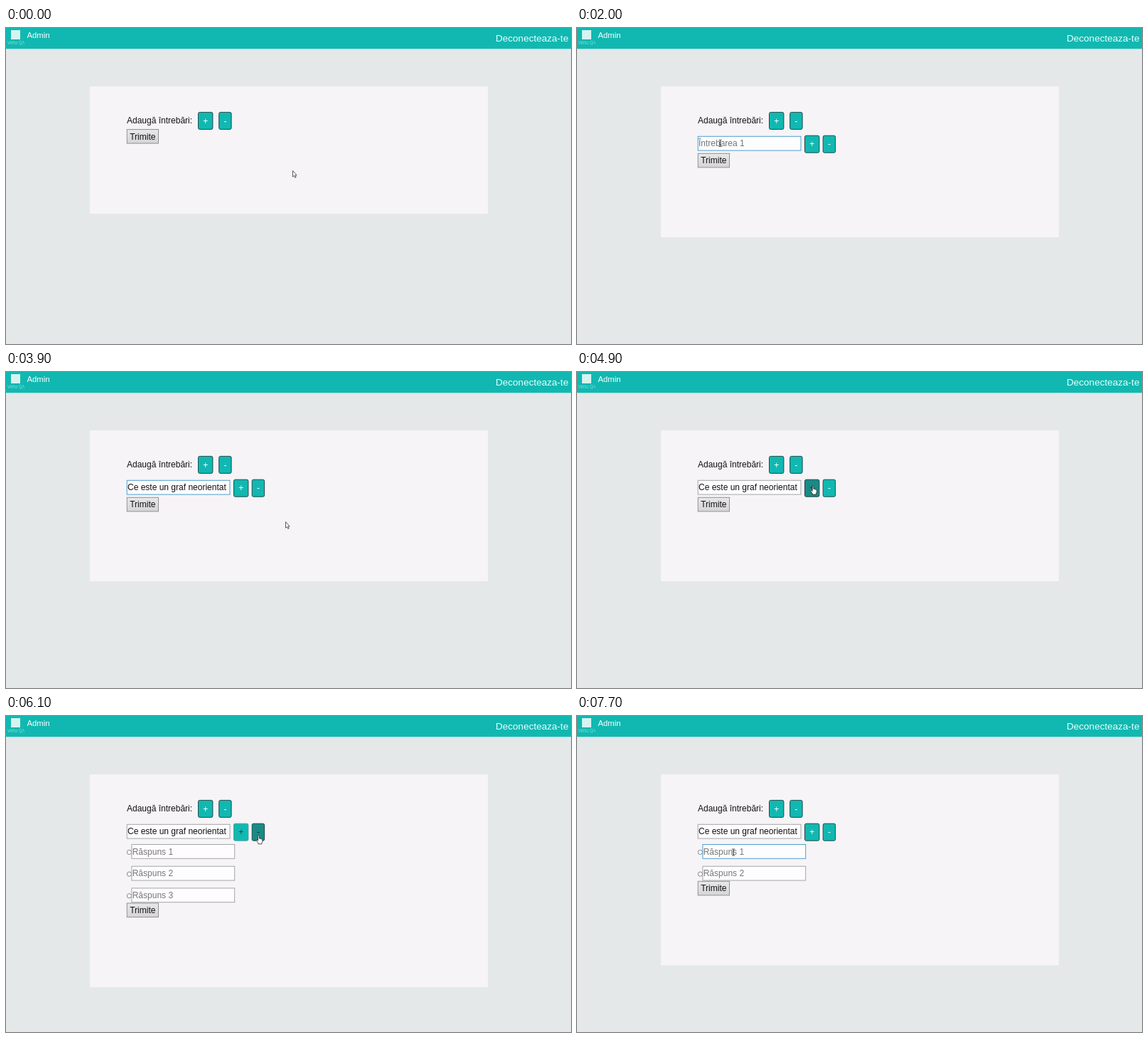
Write an HTML page that moves like this. It is 795 by 444 pixels and loops after 8 s.

```html
<!DOCTYPE html>
<html lang="ro">
<head>
<meta charset="utf-8">
<title>Admin</title>
<style>
  html, body { margin: 0; width: 100%; height: 100%; overflow: hidden; background: #e4e8e9; }
  svg { display: block; width: 100%; height: 100%; }
  text { font: 12px "Liberation Sans", Arial, sans-serif; fill: #111; }
</style>
</head>
<body>
<svg viewBox="0 0 795 444" preserveAspectRatio="none">
  <defs>
    <linearGradient id="grey" x2="0" y2="1">
      <stop stop-color="#e8e7e9"/>
      <stop offset="1" stop-color="#d5d4d6"/>
    </linearGradient>
    <path id="arrow" d="M0 0V8.6L2 6.9L3.3 9.8L4.7 9.2L3.4 6.4H5.6Z" fill="#fff" stroke="#333" stroke-width=".8"/>
    <path id="hand" d="M-.9 6.3V.8Q-.9-.2 0-.2T.9.8V4L2.3 4.2L4.1 4.8Q5.4 5 5.3 6.4V8.6L4.4 10.3V11.8H-.6V10.6L-3 7.4Q-3.6 6.2-2.6 6Q-1.8 5.8-.9 7.2Z" fill="#fff" stroke="#222" stroke-width=".8"/>
    <path id="beam" d="M-1.8-4.6H-.5L0-4.1L.5-4.6H1.8M0-4.1V4.1M-1.8 4.6H-.5L0 4.1L.5 4.6H1.8" fill="none" stroke="#222" stroke-width=".9"/>
  </defs>
  <rect width="795" height="444" fill="#e4e8e9"/>
  <rect width="795" height="29.3" fill="#11b8b1"/>
  <rect x="7" y="3" width="13" height="13" fill="#d5f3f1"/>
  <text x="2" y="23" style="font: 300 6.3px 'Open Sans', sans-serif; fill: #d5f3f1">Velto QA</text>
  <text x="29.5" y="14.2" style="font-size: 11.3px; fill: #fff">Admin</text>
  <text x="689" y="18.5" style="font-size: 13.55px; fill: #e6fffd">Deconecteaza-te</text>
  <g id="page"></g>
</svg>
<script>
const page = document.getElementById("page");
const LOOP = 8000;
const QUESTION = "Ce este un graf neorientat";

// Each scene holds until the next one starts.
const scenes = [
  { at: 0, bottom: 261, send: 142.5, cursor: ["arrow", 403.5, 200.5] },
  { at: 1000, bottom: 261, send: 142.5, add: "hover", cursor: ["hand", 278.6, 137] },
  { at: 2000, bottom: 294, send: 176.3, row: true, focus: "question", cursor: ["beam", 201.5, 162] },
  { at: 3100, bottom: 294, send: 176.3, row: true, text: QUESTION, focus: "question", cursor: ["arrow", 393.5, 210.5] },
  { at: 4100, bottom: 294, send: 176.3, row: true, text: QUESTION, more: "hover", cursor: ["hand", 332, 160.3] },
  { at: 5100, bottom: 350.3, send: 232.3, row: true, text: QUESTION, answers: 2, more: "pressed", cursor: ["hand", 332, 160.3] },
  { at: 6100, bottom: 381, send: 263, row: true, text: QUESTION, answers: 3, more: "focused", less: "hover", cursor: ["hand", 355.5, 168] },
  { at: 7200, bottom: 350.3, send: 232.3, row: true, text: QUESTION, answers: 2, focus: "answer", cursor: ["beam", 220, 191.5] }
];

const label = (x, y, s, more = "") => `<text x="${x}" y="${y}" ${more}>${s}</text>`;

const looks = {
  normal: { fill: "#11b8b1", ink: "#fff", edge: "#23494a" },
  hover: { fill: "#188b87", ink: "#153536", edge: "#204647" },
  pressed: { fill: "#188b87", ink: "#363c3c", edge: "#173536", dash: "2 1" },
  focused: { fill: "#11b8b1", ink: "#164343", edge: "#4b9da8" }
};

function button(x, y, w, sign, state = "normal") {
  const { fill, ink, edge, dash = "none" } = looks[state];
  return `<rect x="${x}" y="${y}" width="${w}" height="24" rx="2" fill="${fill}" stroke="${edge}" stroke-dasharray="${dash}"/>`
    + label(x + w / 2, y + 16.2, sign, `text-anchor="middle" style="fill:${ink}"`);
}

function input(x, y, value, hint, focused) {
  return `<rect x="${x}" y="${y}" width="144.8" height="19.8" fill="#fdfcfe" stroke="${focused ? "#4f9fcd" : "#a5a4a7"}"/>`
    + label(x + 0.8, y + 14, value || hint, value ? "" : `style="fill:#777"`);
}

function answer(i, focused) {
  const y = 180.5 + i * 30.7;
  return `<circle cx="173.4" cy="${y + 10.9}" r="3.1" fill="#fdfcfe" stroke="#777" stroke-width=".9"/>`
    + input(176.9, y, "", `Răspuns ${i + 1}`, focused);
}

function draw(s) {
  let out = `<rect x="118" y="82" width="560" height="${s.bottom - 82}" fill="#f6f4f7"/>`
    + label(170, 133.5, "Adaugă întrebări:")
    + button(270.5, 118.4, 20.4, "+", s.add)
    + button(299.7, 118.4, 17.4, "-");
  if (s.row) {
    out += input(170.2, 152.3, s.text, "Întrebarea 1", s.focus === "question")
      + button(320.5, 151.2, 20.4, "+", s.more)
      + button(346.2, 151.2, 17.4, "-", s.less);
  }
  for (let i = 0; i < (s.answers || 0); i++) out += answer(i, i === 0 && s.focus === "answer");
  out += `<rect x="170.2" y="${s.send}" width="44.3" height="19.6" fill="url(#grey)" stroke="#929194"/>`
    + label(174.2, s.send + 14, "Trimite");
  const [shape, x, y] = s.cursor;
  return out + `<use href="#${shape}" x="${x}" y="${y}"/>`;
}

let shown;
function render(now) {
  const t = now % LOOP;
  const scene = scenes.findLast(s => s.at <= t) || scenes[0];
  if (scene !== shown) page.innerHTML = draw(shown = scene);
}

const start = performance.now();
function tick() {
  render(performance.now() - start);
  requestAnimationFrame(tick);
}
tick();
</script>
</body>
</html>
```
